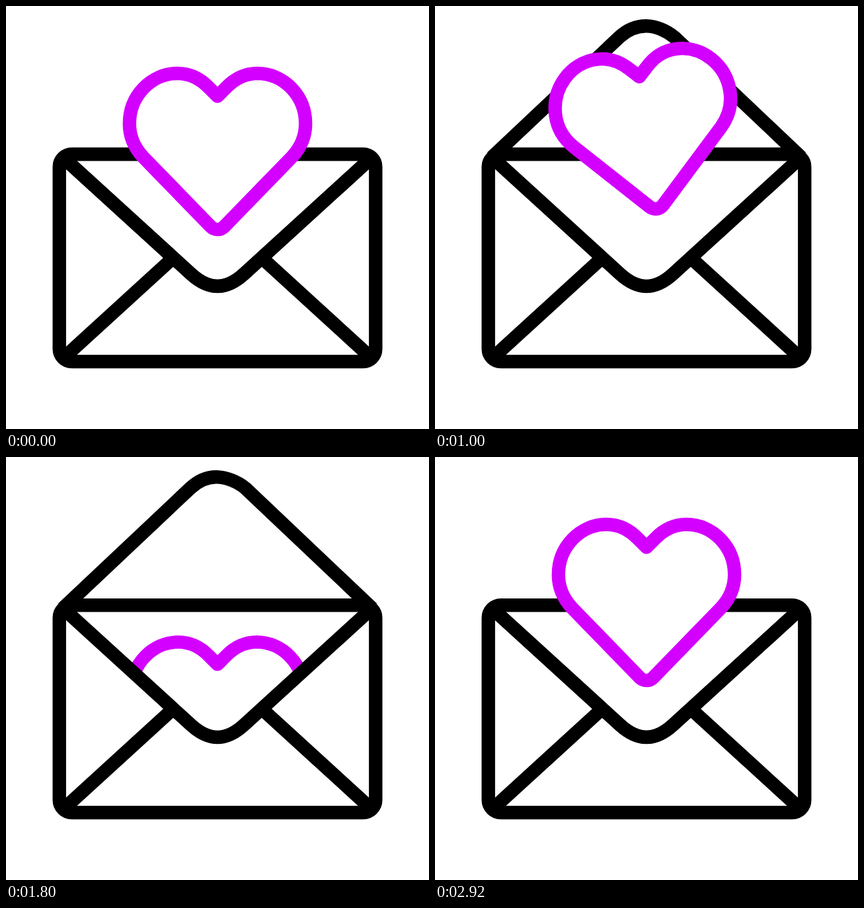
Animation of 640 by 640 pixels, one loop 3 s. Source, as an HTML page without scripts:

```html
<!DOCTYPE html>
<html lang="en">
<head>
<meta charset="utf-8">
<title>Heart letter</title>
<style>
  html, body { margin: 0; width: 100%; height: 100%; overflow: hidden; background: #fff; }
  svg { display: block; width: 100%; height: 100%; }
  .line { fill: none; stroke: #000; stroke-width: 20.4; }

  .flap { animation: flap 3s infinite; }
  .heart {
    fill: #fff; stroke: #d400ff; stroke-width: 20.4; stroke-linejoin: round;
    transform-origin: 320px 220px;
    animation: move 3s infinite, tilt 3s infinite, squeeze 3s infinite;
  }

  /* closed, swung open with a slight overshoot, closed again */
  @keyframes flap {
    0%, 6%, 97.333%, 100% {
      d: path("M88 230.5L280 405.5C293.5 417.8 306.7 423.9 320 423.9C333.3 423.9 346.5 417.8 360 405.5L552 230.5");
    }
    6% { animation-timing-function: cubic-bezier(.42, 0, .7, 1); }
    30% {
      d: path("M86 229L279 43.5C292 31.5 305 26.5 320 26.5C334 26.8 350 33.5 362 43.5L554 229");
      animation-timing-function: ease-in-out;
    }
    33.333%, 43% {
      d: path("M86 229L279 47C292 35 305 30 320 30.2C334 30.5 350 37 362 47L554 229");
    }
    60%, 84% {
      d: path("M86 229L279 47C292 35 305 30 318.5 30.2C333 30.5 350 37 362 47L554 229");
    }
    84% { animation-timing-function: cubic-bezier(.45, 0, .55, 1); }
  }

  @keyframes move {
    0%, 6% { translate: 0 0; animation-timing-function: ease-in-out; }
    15.333% { translate: 0 -6px; animation-timing-function: ease-in; }
    24% { translate: 0 0; animation-timing-function: cubic-bezier(.33, .67, .67, 1); }
    32.167% { translate: 0 -31px; animation-timing-function: cubic-bezier(.33, 0, .67, .33); }
    42.667% { translate: 0 23.6px; animation-timing-function: cubic-bezier(.3, .19, .6, 1); }
    52.667% { translate: 0 190px; animation-timing-function: cubic-bezier(.35, .2, .4, 1); }
    66.667%, 78% { translate: 0 171px; animation-timing-function: cubic-bezier(.2, .5, .45, 1); }
    96%, 100% { translate: 0 0; }
  }

  @keyframes tilt {
    0%, 24% { rotate: 0deg; animation-timing-function: cubic-bezier(.3, .3, .7, .85); }
    33.333% { rotate: -7.5deg; animation-timing-function: cubic-bezier(.3, .5, .6, 1); }
    42.667% { rotate: -10.2deg; animation-timing-function: ease-in-out; }
    56%, 100% { rotate: 0deg; }
  }

  @keyframes squeeze {
    0%, 42.667% { scale: 1; animation-timing-function: ease-in-out; }
    52.667% { scale: .92; animation-timing-function: cubic-bezier(.35, .2, .4, 1); }
    66.667%, 100% { scale: 1; }
  }
</style>
</head>
<body>
<svg viewBox="0 0 640 640">
  <defs>
    <clipPath id="above">
      <path d="M0 0H640V230.5H552L360 405.5C333 430 307 430 280 405.5L88 230.5H0Z"/>
    </clipPath>
  </defs>

  <rect class="line" x="80.7" y="224.2" width="478.6" height="313.8" rx="19"/>
  <path class="line flap" d="M88 230.5L280 405.5C293.5 417.8 306.7 423.9 320 423.9C333.3 423.9 346.5 417.8 360 405.5L552 230.5"/>

  <g clip-path="url(#above)">
    <path class="heart" d="M320 136.5L307 123.5C294 110 278 102 259.5 102
      C219.5 102 186.8 136 186.8 178C186.8 197 194 214 207 228L310 334
      C315.5 339.5 324.5 339.5 330 334L433 228C446 214 453.2 197 453.2 178
      C453.2 136 420.5 102 380.5 102C362 102 346 110 333 123.5Z"/>
  </g>

  <!-- front pocket -->
  <path class="line" d="M88 230.5L280 405.5C307 430 333 430 360 405.5L552 230.5"/>
  <path class="line" d="M92 528L253 381M548 528L387 381"/>
</svg>
</body>
</html>
```
